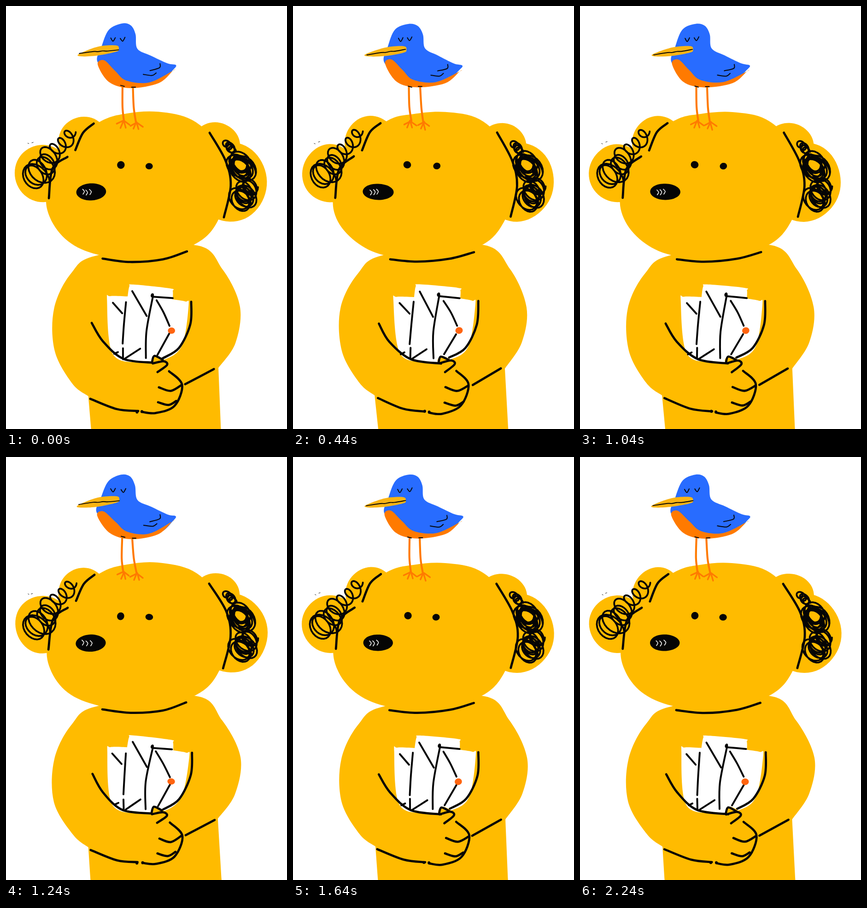
An HTML page with a canvas for the animation above (2320 ms loop, 610 by 917 pixels).

```html
<!DOCTYPE html>
<html lang="en">
<head>
<meta charset="utf-8">
<title>Bear with letters and a bird</title>
<style>
html, body { margin: 0; width: 100%; height: 100%; overflow: hidden; background: #fff; }
canvas { display: block; }
</style>
</head>
<body>
<canvas id="stage" width="610" height="917"></canvas>
<script>
const ctx = document.getElementById('stage').getContext('2d');
const YELLOW = '#ffbb00', BLUE = '#286cff', ORANGE = '#ff7a00', BLACK = '#050505';
const LOOP = 2320, FIRST = 240, STEP = 200, TAU = 2 * Math.PI;

let pose = 0, seed = 0;

// Hand-redrawn wobble: a smooth displacement that differs per pose and shape
function wobble(x, y) {
  return [
    x + 1.1 * Math.sin(x * .03 + y * .023 + pose * 2.4 + seed),
    y + 1.1 * Math.sin(x * .027 - y * .035 + pose * 4.1 + seed * 2)
  ];
}

// Smooth curve through "x y x y ..."; a repeated point makes a corner
function trace(text, closed) {
  seed++;
  const n = text.split(' ').map(Number), pts = [];
  for (let i = 0; i < n.length; i += 2) pts.push(wobble(n[i], n[i + 1]));
  const last = pts.length - 1;
  const at = i => closed ? pts[(i + pts.length) % pts.length] : pts[Math.max(0, Math.min(last, i))];
  ctx.beginPath();
  ctx.moveTo(...pts[0]);
  for (let i = 0; i < last + (closed ? 1 : 0); i++) {
    const [a, b, c, d] = [at(i - 1), at(i), at(i + 1), at(i + 2)];
    ctx.bezierCurveTo(b[0] + (c[0] - a[0]) / 6, b[1] + (c[1] - a[1]) / 6,
      c[0] - (d[0] - b[0]) / 6, c[1] - (d[1] - b[1]) / 6, c[0], c[1]);
  }
}

function fill(color, text) {
  trace(text, true);
  ctx.fillStyle = color;
  ctx.fill();
}

function lines(width, color, ...paths) {
  ctx.lineWidth = width;
  ctx.strokeStyle = color;
  for (const p of paths) { trace(p); ctx.stroke(); }
}

function blob(color, x, y, rx, ry) {
  seed++;
  ctx.beginPath();
  for (let a = 0; a < TAU; a += TAU / 60) ctx.lineTo(...wobble(x + rx * Math.cos(a), y + ry * Math.sin(a)));
  ctx.fillStyle = color;
  ctx.fill();
}

// Uneven loops from one centre to another, bunching up towards the end
function scribble(x0, y0, x1, y1, r0, r1, turns) {
  seed++;
  ctx.beginPath();
  for (let i = 0; i <= turns * 24; i++) {
    const a = i / 24 * TAU, u = 1 - (1 - i / turns / 24) ** 1.6;
    const r = (r0 + (r1 - r0) * u) * (1 + .15 * Math.sin(a * .37 + x0));
    const drift = r * .3 * Math.sin(a * .23);
    ctx.lineTo(...wobble(x0 + (x1 - x0) * u + drift + r * Math.cos(a),
      y0 + (y1 - y0) * u + r * 1.08 * Math.sin(a + .3)));
  }
  ctx.lineWidth = 3.8;
  ctx.strokeStyle = BLACK;
  ctx.stroke();
}

function bear() {
  fill(YELLOW, '200 539 142 580 104 655 105 748 145 818 178 845 178 845 185 925 185 925 468 925 468 925 460 785 460 785 497 730 508 652 470 570 408 517');
  blob(YELLOW, 80, 363, 60, 63);
  blob(YELLOW, 168, 297, 55, 58);
  blob(YELLOW, 455, 302, 52, 49);
  blob(YELLOW, 487, 381, 80, 86);
  fill(YELLOW, '205 250 262 234 330 229 405 246 460 300 485 380 460 466 410 518 300 550 200 540 135 511 95 460 90 400 125 310');

  scribble(144, 270, 64, 372, 9, 24, 9);
  scribble(474, 295, 494, 313, 9, 8, 4);
  scribble(503, 335, 513, 355, 18, 23, 9);
  scribble(530, 386, 512, 421, 16, 21, 9);
  lines(1, BLACK, '47 297 49 298', '55 296 58 295');
  lines(4.8, BLACK,
    '191 255 168 274 151 312',
    '133 326 101 353 92 417',
    '442 274 477 335 487 390 472 457',
    '210 548 270 554 340 549 392 533');
}

function face() {
  blob(BLACK, 248.5, 345, 8, 8);
  blob(BLACK, 311.5, 346.5, 8, 7);
  blob(BLACK, 184.5, 403.5, 33, 18);
  for (let x = 166; x < 190; x += 8) lines(1.6, '#fff', `${x} 398 ${x + 4} 403 ${x + 1} 409`);
}

function letters() {
  fill('#fff', '231 752 219 639 226 630 263 630 263 630 267 607 275 603 357 612 363 618 363 635 363 635 390 640 397 647 381 737 340 768 290 772');
  lines(4, BLACK,
    '231 643 252 666',
    '261 642 257 690 254 732',
    '275 618 305 673',
    '361 634 318 630 318 630 304 705 304 764',
    '326 639 342 665 356 694',
    '355 711 329 756',
    '255 742 255 765',
    '291 743 259 765',
    '243 750 235 754');
  blob('#ff6410', 359.5, 703, 8, 7);
}

function arms() {
  lines(4.8, BLACK,
    '187 688 210 728 255 766 322 774',
    '403 640 400 690 375 742 340 763');
  fill(YELLOW, '315 772 324 759 347 771 335 778');
  lines(4.8, BLACK,
    '316 773 321 759 339 767',
    '318 774 342 769 350 777 329 793',
    '355 792 382 821 365 866 325 883 296 881',
    '332 827 357 835 381 822',
    '329 860 352 866 369 857',
    '184 851 240 874 286 879',
    '390 821 452 786');
  lines(6, BLACK, '285 879 285 879.5', '296 880 296 880.5');
}

function foot(x, y) {
  for (let i = 0; i < 4; i++) {
    const a = 2.7 - i * .7;
    lines(3.4, ORANGE, `${x} ${y} ${x + 15 * Math.cos(a)} ${y + 16 * Math.sin(a)}`);
  }
}

function bird() {
  lines(4.2, ORANGE, '252 174 252 220 256 250', '275 174 278 220 283 252');
  foot(255, 249);
  foot(284, 252);
  fill(BLUE, '250 39 222 52 206 88 198 122 240 155 290 168 335 162 362 139 368 129 350 125 315 108 286 93 281 62 270 43');
  fill(ORANGE, '199 126 213 117 238 140 262 161 310 166 361 141 361 141 330 168 270 177 225 164');
  lines(2, BLACK,
    '228 69 233 76 238 68', '249 70 254 76 259 68',
    '335 126 334 135 313 141', '299 149 318 151 327 145',
    '250 173 258 175', '273 175 281 175');
  ctx.save();
  ctx.translate(245, 95);
  ctx.rotate(.02 * Math.sin(pose * 2.1));
  ctx.translate(-245, -95);
  fill('#fab414', '157 104 200 89 240 86 246 94 240 100 200 108 163 109');
  lines(1.9, BLACK, '159 104 190 99 200 99 211 97 222 97 245 94');
  ctx.restore();
}

function draw() {
  const t = performance.now() % LOOP;
  pose = t < FIRST ? 0 : 1 + Math.floor((t - FIRST) / STEP);
  seed = 0;
  ctx.fillStyle = '#fff';
  ctx.fillRect(0, 0, 610, 917);
  ctx.lineCap = ctx.lineJoin = 'round';
  bear();
  face();
  letters();
  arms();
  bird();
  requestAnimationFrame(draw);
}
draw();
</script>
</body>
</html>
```
